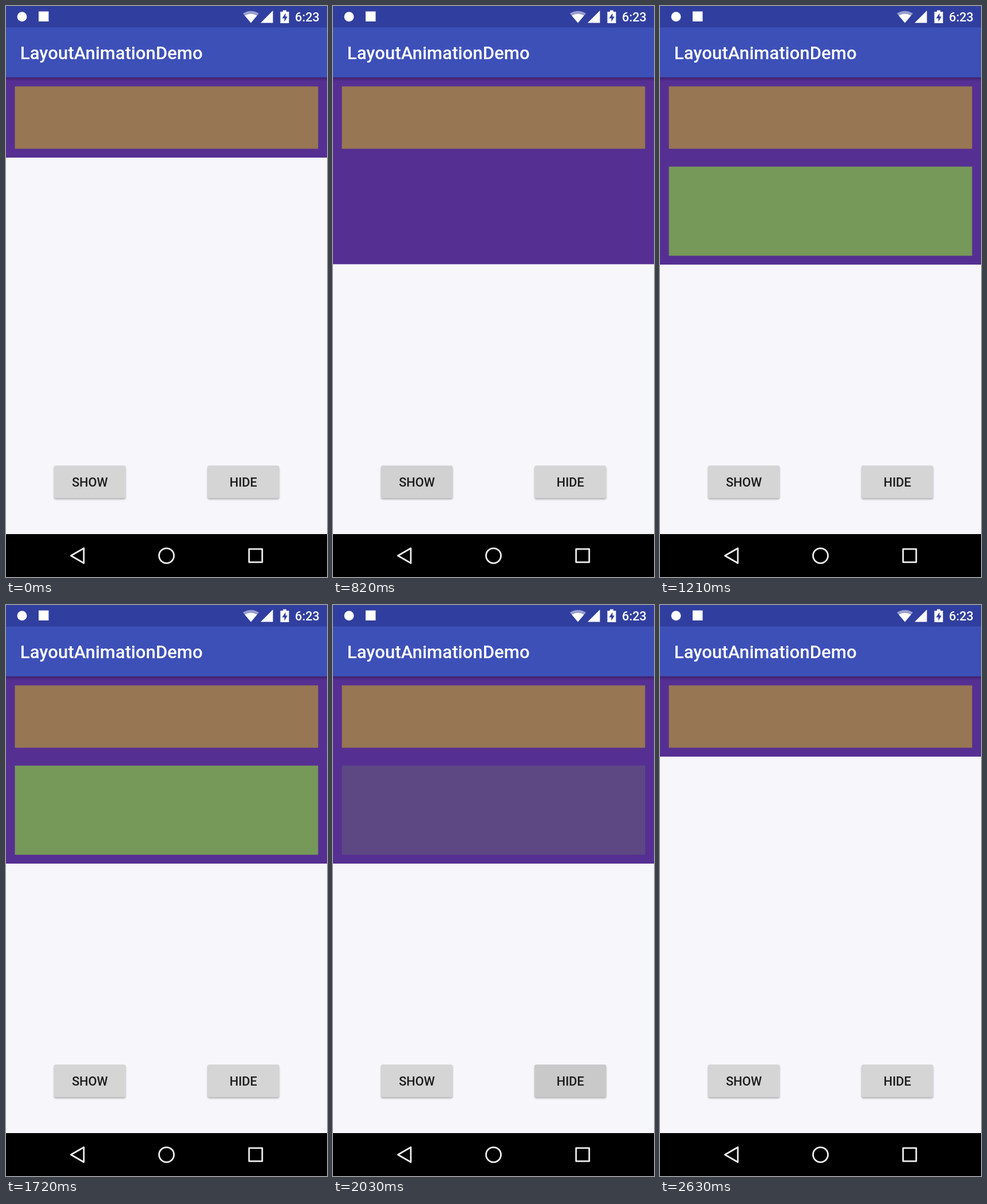
Recreate the animation shown at these times as an HTML page. Size 561 by 998 pixels, loop 2660 ms.

```html
<!DOCTYPE html>
<html lang="en">
<head>
<meta charset="utf-8">
<title>LayoutAnimationDemo</title>
<style>
  html, body { margin: 0; width: 100%; height: 100%; overflow: hidden; background: #f7f7fb; }
  svg { display: block; width: 561px; height: 998px; }
  text { font-family: Roboto, "Noto Sans", sans-serif; font-weight: 500; font-size: 21.8px; }
  .title { font-size: 31.2px; }
  .label { fill: #1b1b1b; text-anchor: middle; }

  .panel, .item, .ripple { animation: 2660ms linear infinite; }
  .panel { animation-name: resize; }
  .item { animation-name: fade; }
  .ripple { transform-box: fill-box; transform-origin: center; }
  .show { animation-name: press-show; }
  .hide { animation-name: press-hide; }

  /* quadratic deceleration */
  @keyframes resize {
    0%, 20.26% { transform: translateY(-187px); animation-timing-function: cubic-bezier(.333, .667, .667, 1); }
    31.54% { transform: none; }
    80.83% { transform: none; animation-timing-function: cubic-bezier(.333, .667, .667, 1); }
    92.11%, 100% { transform: translateY(-187px); }
  }
  /* cosine ease in and out */
  @keyframes fade {
    0%, 30.9% { opacity: 0; animation-timing-function: cubic-bezier(.364, 0, .636, 1); }
    42.18% { opacity: 1; }
    68.8% { opacity: 1; animation-timing-function: cubic-bezier(.364, 0, .636, 1); }
    80.08%, 100% { opacity: 0; }
  }
  @keyframes press-show {
    0%, 16.17% { transform: scale(0); opacity: .065; }
    22.18% { transform: scale(.56); opacity: .065; }
    24.5% { opacity: .065; }
    26.9% { transform: scale(1); }
    33.46%, 100% { transform: scale(1); opacity: 0; }
  }
  @keyframes press-hide {
    0%, 65.04% { transform: scale(0); opacity: .055; }
    75.56% { transform: scale(1); opacity: .055; }
    76.4% { opacity: .055; }
    83.83%, 100% { transform: scale(1); opacity: 0; }
  }
</style>
</head>
<body>
<svg viewBox="0 0 561 998">
  <defs>
    <linearGradient id="shade" x2="0" y2="1">
      <stop stop-opacity=".32"/>
      <stop offset="1" stop-opacity="0"/>
    </linearGradient>
    <filter id="soft" x="-10%" y="-20%" width="120%" height="140%">
      <feGaussianBlur stdDeviation="1.6"/>
    </filter>
    <rect id="key" y="803.3" width="125" height="57" rx="3"/>
    <clipPath id="showClip"><use href="#key" x="84"/></clipPath>
    <clipPath id="hideClip"><use href="#key" x="352.3"/></clipPath>
  </defs>

  <rect width="561" height="998" fill="#f7f7fb"/>

  <rect class="panel" y="-70" width="561" height="522" fill="#562f93"/>
  <rect x="15.5" y="140.5" width="530" height="109" fill="#977653"/>
  <rect class="item" x="15.5" y="280.7" width="530" height="155.8" fill="#769858"/>

  <!-- app bar -->
  <rect y="124" width="561" height="7" fill="url(#shade)"/>
  <rect y="37" width="561" height="87.7" fill="#3d50b8"/>
  <rect width="561" height="37.5" fill="#303f9f"/>
  <text class="title" x="24.8" y="93" fill="#fff">LayoutAnimationDemo</text>

  <!-- status icons -->
  <g fill="#fff">
    <circle cx="28" cy="18.7" r="8.5"/>
    <rect x="57" y="9.5" width="17.5" height="17.5"/>
    <path d="M428 29.5 L414 13 Q428 4.5 442 13 Z" opacity=".5"/>
    <path d="M428 29.5 L417.3 16.8 Q428 10.8 438.7 16.8 Z"/>
    <path d="M445 29.5 H466.5 V8 Z"/>
    <path d="M484 7.5 h6 v2.5 h4.5 v20 h-15 v-20 h4.5 Z"/>
    <text x="505" y="27">6:23</text>
  </g>
  <path d="M488.5 12.5 l-6 9 h4 v6 l5.5 -9 h-3.5 Z" fill="#303f9f"/>

  <!-- buttons -->
  <g opacity=".3" filter="url(#soft)">
    <use href="#key" x="84" y="2"/>
    <use href="#key" x="352.3" y="2"/>
  </g>
  <g fill="#d5d5d6">
    <use href="#key" x="84"/>
    <use href="#key" x="352.3"/>
  </g>
  <g clip-path="url(#showClip)"><circle class="ripple show" cx="151" cy="859" r="100"/></g>
  <g clip-path="url(#hideClip)"><circle class="ripple hide" cx="412" cy="842" r="100"/></g>
  <text class="label" x="146.6" y="839.5">SHOW</text>
  <text class="label" x="414.8" y="839.5">HIDE</text>

  <!-- navigation bar -->
  <rect y="923" width="561" height="75"/>
  <g fill="none" stroke="#f0f0f0" stroke-width="2.8" stroke-linejoin="round">
    <path d="M113.5 960.8 L136 947.8 V973.8 Z"/>
    <circle cx="280.5" cy="960.8" r="13"/>
    <rect x="424.8" y="949.2" width="23" height="23"/>
  </g>
</svg>
</body>
</html>
```
